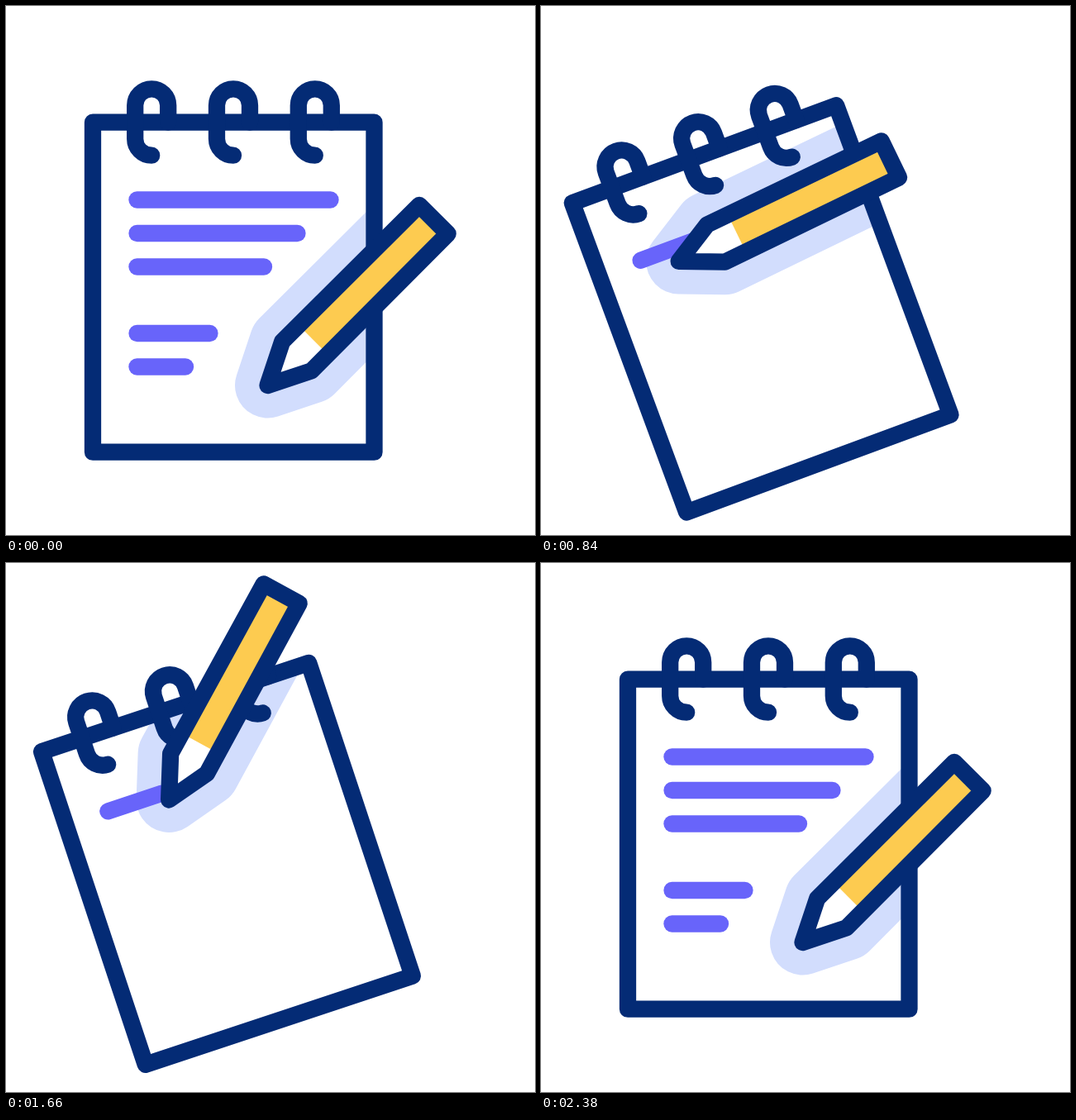
An HTML page with a canvas that plays this animation: 640x640 px, repeating every 2400 ms.

```html
<!DOCTYPE html>
<html lang="en">
<head>
<meta charset="utf-8">
<title>Notepad</title>
<style>
  html, body { margin: 0; width: 100%; height: 100%; overflow: hidden; background: #fff; }
  canvas { display: block; }
</style>
</head>
<body>
<canvas width="640" height="640"></canvas>
<script>
const ctx = document.querySelector('canvas').getContext('2d');
const LOOP = 2400;
const NAVY = '#042b75', PURPLE = '#6864fa', YELLOW = '#fdcb50', HALO = '#d2ddfd';
const RAD = Math.PI / 180;
const WEIGHT = 20.3;
const CENTER = [275.25, 340.2];
const PAD = [105, 140.7, 340.5, 399];

const linear = p => p;
const smooth = p => p * p * (3 - 2 * p);
const easeOut = p => 1 - (1 - p) ** 2;

// Equivalent to cubic-bezier(.83, 0, .17, 1)
function sharp(p) {
  let lo = 0, hi = 1, s = .5;
  for (let i = 0; i < 24; i++) {
    s = (lo + hi) / 2;
    const x = 2.49 * s * (1 - s) ** 2 + .51 * s * s * (1 - s) + s ** 3;
    if (x < p) lo = s; else hi = s;
  }
  return smooth(s);
}

const progress = (t, from, to) => Math.min(1, Math.max(0, (t - from) / (to - from)));

// Each step is [start, end, target value, easing]
function track(t, value, steps) {
  for (const [from, to, target, ease] of steps) {
    if (t <= from) break;
    value += (target - value) * ease(progress(t, from, to));
  }
  return value;
}

// 0 is upright, 1 is fully tilted
const padTilt = t => track(t, 0, [[0, 1202, 1, sharp], [1205, 2368, 0, sharp]]);

// Pencil pose inside the pad's own coordinates
const pencilX = t => track(t, 316.5, [
  [0, 1000, 193, smooth], [1180, 1560, 158, smooth],
  [1560, 1850, 373, linear], [1850, 2180, 316.5, easeOut]]);
const pencilY = t => track(t, 459, [
  [38, 1081, 219.4, smooth], [1180, 1560, 241, smooth],
  [1560, 1860, 254.5, smooth], [1860, 2180, 459, smooth]]);
const pencilAngle = t => track(t, -45, [
  [25, 1050, -.7, smooth], [1180, 1580, -42.7, smooth],
  [1580, 2180, -45, linear]]);

// y, length, erase start, erase end, write start, write end
const LINES = [
  [234.5, 234, 800, 1162, 1545, 1940],
  [275, 194, 590, 810, 1930, 2070],
  [315.5, 153.5, 450, 595, 2050, 2160],
  [396, 88, 340, 490, 2140, 2230],
  [436.5, 58.5, 220, 380, 2220, 2300]
];

function stroke(path, color, width = WEIGHT) {
  ctx.strokeStyle = color;
  ctx.lineWidth = width;
  ctx.stroke(path);
}

const pencil = new Path2D('M0 0L50-25L284-24.5V24.5L50 25Z');
const pencilBody = new Path2D('M78-24.5H284V24.5H78Z');
const ring = new Path2D('M20 140.5V120.3A20 20 0 0 0-20 120.3V160.7A20 20 0 0 0 0 180.7');
const page = new Path2D();
page.rect(...PAD);

function withPencil(t, paint) {
  ctx.save();
  ctx.translate(pencilX(t), pencilY(t));
  ctx.rotate(pencilAngle(t) * RAD);
  paint();
  ctx.restore();
}

function drawHalo(t) {
  ctx.save();
  ctx.clip(page);
  withPencil(t, () => {
    ctx.fillStyle = HALO;
    ctx.fill(pencil);
    stroke(pencil, HALO, 79);
  });
  ctx.restore();
}

function drawLines(t) {
  for (const [y, length, eraseFrom, eraseTo, writeFrom, writeTo] of LINES) {
    const shown = 1 - progress(t, eraseFrom, eraseTo) + progress(t, writeFrom, writeTo);
    if (shown <= 0) continue;
    const path = new Path2D();
    path.moveTo(158.5, y);
    path.lineTo(158.5 + length * shown, y);
    stroke(path, PURPLE);
  }
}

function drawRings() {
  for (const x of [176.2, 275, 373.8]) {
    ctx.save();
    ctx.translate(x, 0);
    stroke(ring, NAVY);
    ctx.restore();
  }
}

function drawPencil() {
  ctx.fillStyle = '#fff';
  ctx.fill(pencil);
  ctx.fillStyle = YELLOW;
  ctx.fill(pencilBody);
  stroke(pencil, NAVY);
}

function draw(now) {
  const t = now % LOOP;
  const tilt = padTilt(t);
  const [cx, cy] = CENTER;
  ctx.fillStyle = '#fff';
  ctx.fillRect(0, 0, 640, 640);
  ctx.lineCap = ctx.lineJoin = 'round';
  ctx.save();
  ctx.translate(cx - 9.25 * tilt, cy + 28.2 * tilt);
  ctx.rotate(-21.85 * tilt * RAD);
  ctx.translate(-cx, -cy);
  drawHalo(t);
  drawLines(t);
  stroke(page, NAVY);
  drawRings();
  withPencil(t, drawPencil);
  ctx.restore();
}

const start = performance.now();
function tick() {
  draw(performance.now() - start);
  requestAnimationFrame(tick);
}
tick();
</script>
</body>
</html>
```
